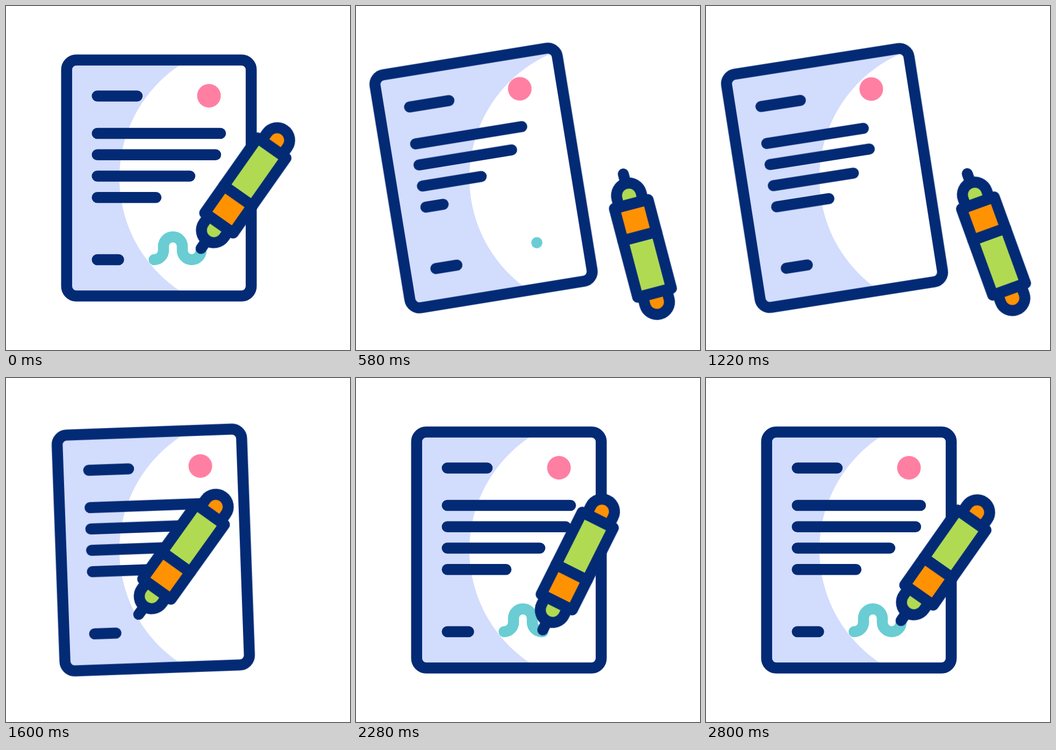
These frames come from a looping animation (640x640 px, 3600 ms). An HTML page without scripts:

```html
<!DOCTYPE html>
<html lang="en">
<head>
<meta charset="utf-8">
<title>Signing a document</title>
<style>
  html, body { margin: 0; height: 100%; overflow: hidden; background: #fff; }
  svg { display: block; width: 100vw; height: 100vh; }

  .ink { fill: none; stroke: #032a75; stroke-width: 20.5; stroke-linecap: round; stroke-linejoin: round; }
  .paper, .line, .sign, .fly, .fly-x, .fly-y, .fly-spin, .write {
    animation: 3.6s linear infinite;
  }

  /* sheet */
  .paper { transform-origin: 284.5px 320px; animation-name: tilt; }
  @keyframes tilt {
    0% { transform: none; animation-timing-function: cubic-bezier(.27, 0, .38, 1); }
    22.22%, 28.89% { transform: translate(-51px, 0) rotate(-10deg); animation-timing-function: cubic-bezier(.38, 0, .52, 1); }
    52.78%, 100% { transform: none; }
  }

  /* text lines shrink and grow back */
  .line { stroke-dasharray: 1 2; animation-timing-function: cubic-bezier(.333, 0, .667, 1); }
  .l1 { animation-name: l1; }
  .l2 { animation-name: l2; }
  .l3 { animation-name: l3; }
  .l4 { animation-name: l4; }
  @keyframes l1 { 0%, 13.6%, 37.6%, 100% { stroke-dashoffset: 0; } 25% { stroke-dashoffset: 1; } }
  @keyframes l2 { 0%, 12.7%, 37%, 100% { stroke-dashoffset: 0; } 24.44% { stroke-dashoffset: 1; } }
  @keyframes l3 { 0%, 10.9%, 36.6%, 100% { stroke-dashoffset: 0; } 23.9%, 24.44% { stroke-dashoffset: 1; } }
  @keyframes l4 { 0%, 4.44%, 36.2%, 100% { stroke-dashoffset: 0; } 22.78%, 24.44% { stroke-dashoffset: 1; } }

  /* signature */
  .sign { stroke: #69cdd3; stroke-dasharray: 1 2; animation-name: sign, sign-show; animation-timing-function: linear, step-end; }
  @keyframes sign {
    0% { stroke-dashoffset: 0; animation-timing-function: cubic-bezier(.333, 0, .667, 1); }
    16.67% { stroke-dashoffset: -1; animation-timing-function: step-end; }
    50% { stroke-dashoffset: 1; animation-timing-function: cubic-bezier(.15, 0, .12, 1); }
    77.78%, 100% { stroke-dashoffset: 0; }
  }
  @keyframes sign-show {
    0%, 50%, 100% { visibility: visible; }
    16.67% { visibility: hidden; }
  }

  /* pen in the air, turning about its middle */
  .fly { animation-name: fly; animation-timing-function: step-end; }
  .fly-x { animation-name: fly-x; }
  .fly-y { animation-name: fly-y; }
  .fly-spin { animation-name: fly-spin; }
  @keyframes fly { 0% { visibility: visible; } 50%, 100% { visibility: hidden; } }
  @keyframes fly-x {
    0% { transform: translateX(445.2px); animation-timing-function: cubic-bezier(.19, 0, .54, 1); }
    22.22%, 28.89% { transform: translateX(545px); animation-timing-function: cubic-bezier(.78, 0, .49, 1); }
    50%, 100% { transform: translateX(290.4px); }
  }
  @keyframes fly-y {
    0% { transform: translateY(334px); animation-timing-function: cubic-bezier(.63, 0, .47, 1); }
    22.22%, 28.89% { transform: translateY(469px); animation-timing-function: cubic-bezier(.5, 0, .7, 1); }
    44.44% { transform: translateY(323.4px); animation-timing-function: ease-in-out; }
    50%, 100% { transform: translateY(326.8px); }
  }
  @keyframes fly-spin {
    0% { transform: rotate(35.1deg); animation-timing-function: cubic-bezier(.12, 0, .52, 1); }
    22.22%, 28.89% { transform: rotate(180deg); animation-timing-function: cubic-bezier(.41, 0, .64, 1); }
    50%, 100% { transform: rotate(6deg); }
  }

  /* pen writing, its tip led along the signature */
  .write {
    offset-path: path("M275.5 472a17.5 17.5 0 0 0 17.5-17.5v-7.5a17.5 17.5 0 0 1 35 0v7.5a17.5 17.5 0 0 0 35 0");
    offset-rotate: 0deg;
    animation-name: trace, lean, write;
    animation-timing-function: linear, linear, step-end;
  }
  @keyframes trace {
    0%, 50% { offset-distance: 0%; animation-timing-function: cubic-bezier(.15, 0, .12, 1); }
    77.78%, 100% { offset-distance: 100%; }
  }
  @keyframes lean {
    0%, 50% { transform: rotate(6deg); animation-timing-function: cubic-bezier(.25, 0, .35, 1); }
    77.78%, 100% { transform: rotate(35.1deg); }
  }
  @keyframes write { 0% { visibility: hidden; } 50%, 100% { visibility: visible; } }
</style>
</head>
<body>
<svg viewBox="0 0 640 640">
  <defs>
    <!-- tip at 0,0, pointing down -->
    <g id="pen" class="ink">
      <path d="M0 0V-25"/>
      <path fill="#b1da53" d="M-23.2-57.7V-41.5A23.2 23.2 0 0 0 23.2-41.5V-57.7Z"/>
      <path fill="#ff9203" d="M-23.2-229V-246A23.2 23.2 0 0 1 23.2-246V-229Z"/>
      <path fill="#b1da53" d="M-32.4-228.4H32.4V-119.5H-32.4Z"/>
      <path fill="#ff9203" d="M-32.4-119.5H32.4V-57.7H-32.4Z"/>
    </g>
  </defs>

  <rect class="paper" x="112.8" y="100.4" width="343.4" height="439.2" rx="18" fill="#d2dcfd"/>
  <circle cx="463.5" cy="320" r="252.5" fill="#fff"/>

  <g class="paper">
    <circle cx="377.6" cy="167" r="22" fill="#ff7fa3"/>
    <g class="ink">
      <rect x="112.8" y="100.4" width="343.4" height="439.2" rx="18"/>
      <path d="M169.8 167.5H244M169.8 472H209.5"/>
      <path class="line l1" pathLength="1" d="M169.8 237H399"/>
      <path class="line l2" pathLength="1" d="M169.8 276.8H390"/>
      <path class="line l3" pathLength="1" d="M169.8 316.4H342"/>
      <path class="line l4" pathLength="1" d="M169.8 356.2H279"/>
      <path class="sign" pathLength="1" d="M275.5 472a17.5 17.5 0 0 0 17.5-17.5v-7.5a17.5 17.5 0 0 1 35 0v7.5a17.5 17.5 0 0 0 35 0"/>
    </g>
  </g>

  <g class="fly"><g class="fly-x"><g class="fly-y"><g class="fly-spin">
    <use href="#pen" y="143"/>
  </g></g></g></g>

  <g transform="translate(0 -3.3)"><g class="write"><use href="#pen"/></g></g>
</svg>
</body>
</html>
```
